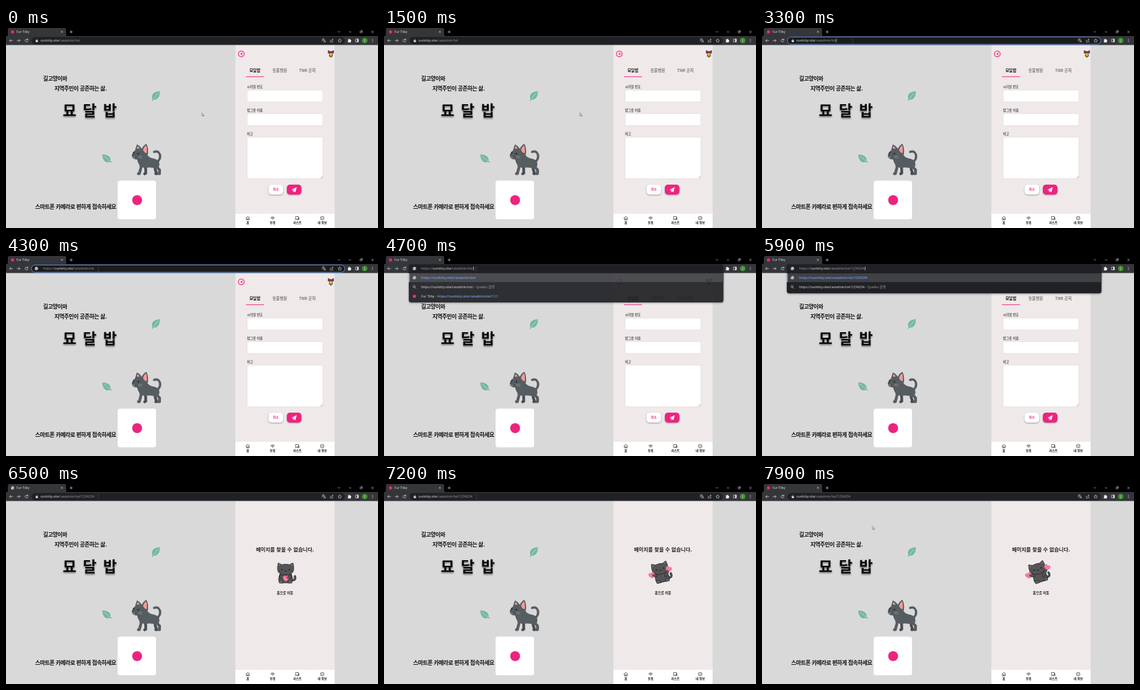
An HTML page that plays this animation: 600 by 323 pixels, repeating every 8000 ms.

```html
<!DOCTYPE html>
<html lang="ko">
<head>
<meta charset="utf-8">
<title>Fur Tilby</title>
<style>
html, body { margin: 0; width: 100%; height: 100%; overflow: hidden; background: #dad9da; }
svg { display: block; width: 100vw; height: 100vh; }
text { font-family: "Noto Sans CJK KR", "Noto Sans CJK", sans-serif; white-space: pre; }
.ui { font-family: "Open Sans", "Noto Sans CJK KR", sans-serif; }
#brand { filter: drop-shadow(0 2px 1.2px rgba(0,0,0,.45)); }
.raised { filter: drop-shadow(0 1px 1px rgba(0,0,0,.35)); }
#drop { filter: drop-shadow(0 1px 1.5px rgba(0,0,0,.4)); }
</style>
</head>
<body>
<svg id="stage" viewBox="0 0 600 323" preserveAspectRatio="none"></svg>
<script>
const PINK = '#ee237f', BAR = '#202124', TOOL = '#35363a', ICON = '#d6d8db', DIM = '#9aa0a6';
const LOOP = 8000, STEP = 100;

// y is the vertical middle of the line
const text = (x, y, s, size, fill, extra = '') =>
  `<text x="${x}" y="${y + size * .36}" font-size="${size}" fill="${fill}" ${extra}>${s}</text>`;
const ui = (x, y, s, size, fill, extra = '') => text(x, y, s, size, fill, `class="ui" ${extra}`);
const box = (x, y, w, h, fill, r = 0, extra = '') =>
  `<rect x="${x}" y="${y}" width="${w}" height="${h}" rx="${r}" fill="${fill}" ${extra}/>`;
const dot = (x, y, r, fill, extra = '') => `<circle cx="${x}" cy="${y}" r="${r}" fill="${fill}" ${extra}/>`;
const line = (d, color = ICON, w = .8, extra = '') =>
  `<path d="${d}" fill="none" stroke="${color}" stroke-width="${w}" stroke-linecap="round" stroke-linejoin="round" ${extra}/>`;
const shape = (d, fill, extra = '') => `<path d="${d}" fill="${fill}" ${extra}/>`;
const group = (id, s, extra = '') => `<g id="${id}" ${extra}>${s}</g>`;
const at = (x, y, s, more = '') => `<g transform="translate(${x} ${y}) ${more}">${s}</g>`;
const bold = 'font-weight="700" ', black = 'font-weight="900" ', mid = 'text-anchor="middle"';

const globe = (x, y) => at(x, y, dot(0, 0, 2.6, ICON) +
  shape('M-1.8-1.2Q-.4-1.6 0-.6Q-.8.2-1.8.1ZM.4.3Q1.8 0 1.7 1Q1 1.9.4 1.6Z', TOOL));
const heart = 'M0 4.2C-6 .4-4.6-3.8-2.2-3.8C-.8-3.8 0-2.4 0-1.8C0-2.4.8-3.8 2.2-3.8C4.6-3.8 6 .4 0 4.2Z';

function chrome() {
  return box(0, 0, 600, 14, '#000') +
    shape('M0 13.5Q3 13.5 3 10.5V3Q3 0 6 0H94Q97 0 97 3V10.5Q97 13.5 100 13.5Z', TOOL) +
    box(0, 13, 600, 14.5, TOOL) +
    group('favGlobe', globe(10.5, 6.3)) + dot(10.5, 6.3, 2.6, PINK, 'id="favDot"') +
    ui(17, 6.4, 'Fur Tilby', 5.2, '#e8eaed') +
    line('M89 5l2.4 2.4m0-2.4l-2.4 2.4M103 6.3h4.2m-2.1-2.1v4.2', ICON, .7) +
    line('M535.6 5.6l1.4 1.4l1.4-1.4M553.4 6.3h3M571.4 5.2h2.6v2.6h-2.6zM572.3 4.4h2.6v2.6M589.6 4.8l3 3m0-3l-3 3', ICON, .6) +
    line('M10.8 20.3H5.9m2-2l-2 2l2 2M17.8 20.3h4.9m-2-2l2 2l-2 2', ICON, .75) +
    line('M34.8 18.7A2.3 2.3 0 1 0 35.3 21M35.3 17.6v1.7h-1.7', ICON, .75) +
    shape('M551.5 18.4h1.4q.7-2.2 1.6 0h1.6v1.5q2 .7 0 1.7v1.6h-4.6v-1.6q1.4-.8 0-1.7z', '#f1f3f4') +
    box(563.7, 17.8, 4.8, 4.7, 'none', .5, `stroke="${ICON}" stroke-width=".8"`) + box(566.2, 17.8, 2.3, 4.7, ICON) +
    dot(578.6, 20.2, 4.4, '#40932f') + ui(578.6, 20.2, 'J', 4.6, '#fff', mid) +
    [18.3, 20.2, 22.1].map(y => dot(591, y, .6, ICON)).join('') +
    box(41, 14.6, 505.5, 11.6, BAR, 5.8, 'id="bar"') +
    group('tools',
      line('M510 18h4m-2-1v1q0 2.2-2.4 3.2m.8-2.2q1 1.6 2 1.8M512.6 23l1.5-3.6l1.5 3.6m-2.4-1h1.8', ICON, .6) +
      line('M523 19.5v3.4h4.2v-2M524.5 21q.3-2.5 3-2.5m-1.2-1.3l1.4 1.3l-1.4 1.3', ICON, .6) +
      line('M538.3 17.4l.9 2l2.1.2l-1.6 1.4l.5 2.1l-1.9-1.1l-1.9 1.1l.5-2.1l-1.6-1.4l2.1-.2z', ICON, .6));
}

function leaf(x, y, turn) {
  return at(x, y, shape('M-9 3C-9-6 2-7 10-3C5 6-4 8-9 3Z', '#74b7a2') +
    line('M-11 4.5Q-3 1 6-2', '#d7e5df', .7) + line('M-11 4.5L-8 3', '#5a9c89', 1), `rotate(${turn}) scale(.86 .98)`);
}

function kitty() {
  const fur = '#565d61', deep = '#474d51';
  return line('M243 217Q250 212 248.3 204.5Q246 197.5 239 200', fur, 3.8) +
    line('M225 220L225.5 234.5L223.5 235.4', deep, 4.4) + line('M242 219L240.5 228L243 235.3H241.5', deep, 4.4) +
    shape('M211 208L228 205Q231 210 239 211Q248 213 247.5 221Q246 227 241 227Q235 224.5 227 225.5Q219 227 215 221Q211.5 216 211 208Z', fur) +
    line('M218 219L217.5 226L215 235.3H213.5', fur, 4.6) + line('M244.5 220L243.8 225L247.6 229V235.3H246', fur, 4.6) +
    shape('M208 198L211 188Q216 190 219 195Q222 189 226.5 187Q230 194 229 203Q227 213 216 212.5Q203 213 203 207Q203.5 200 208 198Z', fur) +
    shape('M221 197Q223 191 226 189.5Q228 195 227 202Q223 202 221 197ZM211 195L212 190.5L216 194.5Z', '#f29a9a') +
    shape('M202.8 205.4Q204 203.6 206 204.5Q206 206 204.2 206.6Z', '#33393c') +
    dot(213, 202.5, 1.8, '#1e2224') + dot(212.6, 201.9, .55, '#fff') + dot(206.3, 201.6, 1.1, '#1e2224') +
    line('M204.6 207.6Q207 210 210 208.2', '#272c2f', .7) +
    line('M207 207.8L201 205.5M207 208.6L200.5 209M208 209.4L202 212M214 207.6l6-.6M214 208.8l5.5 1.6', '#c8cccd', .4);
}

function left() {
  const tight = black + 'letter-spacing="-.5"';
  return text(59.7, 82, '길고양이와', 9, '#111', tight) +
    text(78, 97.5, '지역주민이 공존하는 삶.', 9, '#111', tight) +
    text(91.5, 133, '묘 달 밥', 24, '#0a0a0a', black + 'id="brand" letter-spacing="1.9"') +
    leaf(242, 109, -28) + leaf(162, 210.5, -118) + kitty() +
    box(180, 246.5, 62, 62.5, '#fff', 4) + dot(211.5, 278, 8, PINK) +
    text(47, 288.5, '스마트폰 카메라로 편하게 접속하세요', 9, '#111', tight);
}

function form() {
  const field = (y, h) => box(389, y, 122, h, '#fff', 2, 'stroke="#e2dcdc" stroke-width=".7"');
  const label = (y, s) => text(388.7, y, s, 5.2, '#555', bold);
  const tab = (x, s, fill) => text(x, 68.8, s, 6.4, fill, black + mid);
  return dot(379.5, 41.8, 4.7, 'none', `stroke="${PINK}" stroke-width="1.2"`) +
    line('M381.3 39.8l-2.6 2l2.6 2M378.8 41.8h2.4', PINK, 1) +
    shape('M519.8 36.5L524 38.5L528.2 36.5V40.8L524 39.2L519.8 40.8Z', '#ef2b86', 'stroke="#111" stroke-width=".8"') +
    shape('M521.4 45Q522 44.4 522 42Q522.2 39.4 524 39.4Q525.8 39.4 526 42Q526 44.4 526.8 45.4H521.2Z', '#f6d51f', 'stroke="#111" stroke-width=".8"') +
    dot(524, 46.6, 1, '#f6d51f', 'stroke="#111" stroke-width=".6"') +
    tab(401.5, '묘달밥', '#111') + tab(441.5, '동물병원', '#777') + tab(486, 'TNR 공지', '#777') +
    box(387, 78.2, 29, 1, PINK) +
    label(94.8, '시리얼 번호') + field(100.3, 19) +
    label(132.8, '밥그릇 이름') + field(138.3, 19.3) +
    label(171, '비고') + field(176.3, 67) +
    line('M507.5 242.2l2.7-2.7m-1 2.7l1-1', '#666', .5) +
    box(423.5, 253, 23.5, 16, '#fff', 5, 'class="raised"') + text(435.2, 260.5, '취소', 5, PINK, black + mid) +
    box(453, 253, 23.5, 16, PINK, 5, 'class="raised"') +
    shape('M460.5 261.2L469 257L466.7 265.3L464.3 263.6L462.9 265.4V262.6L467 259L462.2 262.1Z', '#fff');
}

function notFound() {
  const skin = '#555558', ink = 'stroke="#262628" stroke-width=".8"', tail = 'M9 12Q17 13 15 6';
  const cat =
    line(tail, '#262628', 3.6) + line(tail, skin, 2.2) +
    shape('M-9 1Q-14 15-8 16.5H8Q14 15 9 1Z', skin, ink) +
    shape('M-10 16.8Q-12 11.5-7 12.5Q-3 13.5-4 16.8ZM4 16.8Q3 13 7 12.5Q12 11.5 10 16.8Z', '#68686b', ink) +
    shape('M-13-4.5Q-13.5-9-12-15.5Q-9-15-6.5-13Q0-14.4 6.5-13Q9-15 12-15.5Q13.5-9 13-4.5Q11 3.5 0 3.5Q-11 3.5-13-4.5Z', skin, ink) +
    shape('M-11.2-11L-10.9-13.8L-8.6-12.6ZM11.2-11L10.9-13.8L8.6-12.6Z', '#8b8b8e') +
    dot(-6, -5, 1, '#111') + dot(6, -5, 1, '#111') +
    line('M-2-3Q-1-1.5 0-3Q1-1.5 2-3', '#111', .7) +
    line('M-9-2.5l-4-.6M-9-1l-4 .8M9-2.5l4-.6M9-1l4 .8', '#222', .35);
  return text(450, 106.3, '페이지를 찾을 수 없습니다.', 8.3, '#222', bold + mid) +
    group('pose', cat) +
    ['L', 'R'].map(s => line('', '#262628', 4.8, `id="rim${s}"`) +
      shape(heart, '#f97c9f', `id="heart${s}" stroke="#d45578" stroke-width=".5"`) +
      line('', skin, 3.4, `id="arm${s}"`)).join('') +
    text(450, 176, '홈으로 이동', 5.4, '#111', black + mid);
}

function nav() {
  const name = (x, s) => text(x, 314.2, s, 4.9, '#111', black + mid);
  const k = '#222';
  return box(370, 300, 160, 23, '#fff') +
    line('M387 307l3-2.8l3 2.8M387.8 306.6v3.4h1.5v-2h1.4v2h1.5v-3.4', k, .7) +
    line('M427 306.2Q430 303.6 433 306.2M428.1 307.5Q430 306 431.9 307.5', k, .8) + dot(430, 309, .7, k) +
    line('M467.4 304.4h4.2v4h-2.6l-1.6 1.2zM472.6 306v4l-1-.8h-2', k, .7) +
    dot(510, 307, 2.9, 'none', `stroke="${k}" stroke-width=".7"`) + line('M508.7 306.8Q510 309 511.3 306.8', k, .7) +
    name(390, '홈') + name(430, '등록') + name(470, '리스트') + name(510, '내 정보');
}

function dropdown() {
  const link = '#6f9ff0', semi = 'font-weight="600"';
  return box(40, 13.6, 507.5, 61.4, BAR, 4, 'id="panel"') +
    box(40, 28, 507.5, 14.2, '#3f4145') + box(40, 28, 1.2, 14.2, '#8ab4f8') + globe(49, 35) +
    ui(60, 35, '', 5.4, link, semi + ' id="row1"') +
    dot(48.5, 49.4, 1.7, 'none', `stroke="${ICON}" stroke-width=".7"`) + line('M49.8 50.7l1.7 1.7', ICON, .7) +
    ui(60, 50, '', 5.4, '#e8eaed', 'id="row2"') +
    group('row3', dot(49, 65, 2.6, PINK) + ui(60, 65,
      `Fur Tilby <tspan fill="${DIM}">- </tspan><tspan fill="${link}" ${semi}>https://ourkitty.site/catadmin/iot/</tspan><tspan fill="${link}">123</tspan>`, 5.4, '#e8eaed'));
}

const stage = document.getElementById('stage');
stage.innerHTML = box(0, 0, 600, 323, '#dad9da') + left() + box(370, 27, 160, 296, '#efe9e9') +
  group('form', form()) + group('lost', notFound()) + nav() + chrome() + group('drop', dropdown()) +
  group('lock', box(47.9, 19.8, 3.6, 2.9, ICON, .4) + line('M48.7 19.8v-.9q1-1.7 2 0v.9', ICON, .6)) +
  group('barGlobe', globe(49, 20.2)) +
  ui(0, 20.2, '', 5.4, DIM, 'id="url"') + box(0, 17.3, .6, 6, '#fff', 0, 'id="caret"') +
  group('beam', line('M-1-3h2M0-3v6M-1 3h2', '#4a4c50', .5)) +
  group('arrow', shape('M0 0V5L1.2 3.9L2 5.7L2.8 5.3L2 3.6H3.6Z', '#fff', 'stroke="#333" stroke-width=".5"'));

const $ = id => document.getElementById(id);
const show = (id, on) => $(id).setAttribute('visibility', on ? 'visible' : 'hidden');
const move = (id, x, y, more = '') => $(id).setAttribute('transform', `translate(${x} ${y}) ${more}`);
const ease = (t, a, b) => { const p = Math.min(1, Math.max(0, (t - a) / (b - a))); return p * p * (3 - 2 * p); };
const mix = (a, b, p) => a + (b - a) * p;

// time, path after the host
const typed = [[0, ''], [4700, '/'], [4900, '/1'], [5000, '/12'], [5200, '/123'], [5400, '/1234'],
  [5600, '/12342'], [5700, '/123423'], [5900, '/1234234']];

function address(t) {
  const path = '/catadmin/iot' + typed.filter(k => k[0] <= t).pop()[1];
  const full = t >= 3600 && t < 6200, open = t >= 4700 && t < 6200, focus = t >= 3200 && t < 6200;
  const x = full ? 60 : 55.6, url = $('url');
  url.setAttribute('x', x);
  url.innerHTML = `${full ? 'https://' : ''}<tspan fill="#e8eaed">ourkitty.site</tspan>${path}`;
  $('caret').setAttribute('x', x + url.getComputedTextLength() + .5);
  show('caret', focus && !(t >= 4200 && t < 4400));
  $('bar').setAttribute('stroke', focus && !open ? '#5f8fdc' : 'none');
  $('bar').setAttribute('fill', focus ? '#1b1c1e' : BAR);
  show('lock', !full);
  show('barGlobe', full);
  show('tools', !open);

  const third = open && t < 5400;
  show('drop', open);
  show('row3', third);
  $('drop').setAttribute('opacity', t < 4800 ? .92 : 1);
  $('panel').setAttribute('height', third ? 61.4 : 46.6);
  $('row1').textContent = 'https://ourkitty.site' + path;
  $('row2').innerHTML = `https://ourkitty.site${path} <tspan fill="${DIM}">- Quelbo 검색</tspan>`;
}

function pointer(t) {
  const a = ease(t, 2500, 3000), b = ease(t, 7200, 7700);
  const x = mix(mix(316, 146, a), 178, b), y = mix(mix(137, 20, a), 68.3, b);
  const inBar = y < 27 && t > 2500;
  show('beam', inBar);
  show('arrow', !inBar);
  move('beam', t >= 4200 ? Math.max(x, 149) : x, y + 1);
  move('arrow', x, y);
}

function lostCat(t) {
  const p = ease(t, 6800, 7300);
  const sway = p * Math.sin((t - 7900) / 800 * Math.PI * 2);
  const x = mix(451, 446, p), y = mix(143.2, 142, p), turn = mix(0, -18, p) + sway * 4;
  move('pose', x, y, `rotate(${turn})`);
  const arm = (s, from, hug, out, tilt) => {
    const hx = mix(hug[0], out[0], p), hy = mix(hug[1], out[1], p) + sway * (s === 'L' ? -1.5 : 1.5);
    const reach = mix(.6, .7, p), sx = x + from, sy = y + 6;
    const d = `M${sx} ${sy}L${mix(sx, hx, reach)} ${mix(sy, hy, reach)}`;
    $('rim' + s).setAttribute('d', d);
    $('arm' + s).setAttribute('d', d);
    move('heart' + s, hx, hy, `rotate(${tilt * p}) scale(1.1)`);
  };
  arm('L', -8, [451.5, 152.5], [430, 147.8], -25);
  arm('R', 8, [451.5, 152.5], [459.5, 134.8], 25);
}

function draw(time) {
  const t = Math.floor(time % LOOP / STEP) * STEP, gone = t >= 6300;
  show('form', !gone);
  show('lost', gone);
  const loading = t >= 6200 && t < 7100;
  show('favGlobe', loading);
  show('favDot', !loading);
  address(t);
  pointer(t);
  lostCat(t);
}

const start = performance.now();
function tick() {
  draw(performance.now() - start);
  requestAnimationFrame(tick);
}
tick();
</script>
</body>
</html>
```
